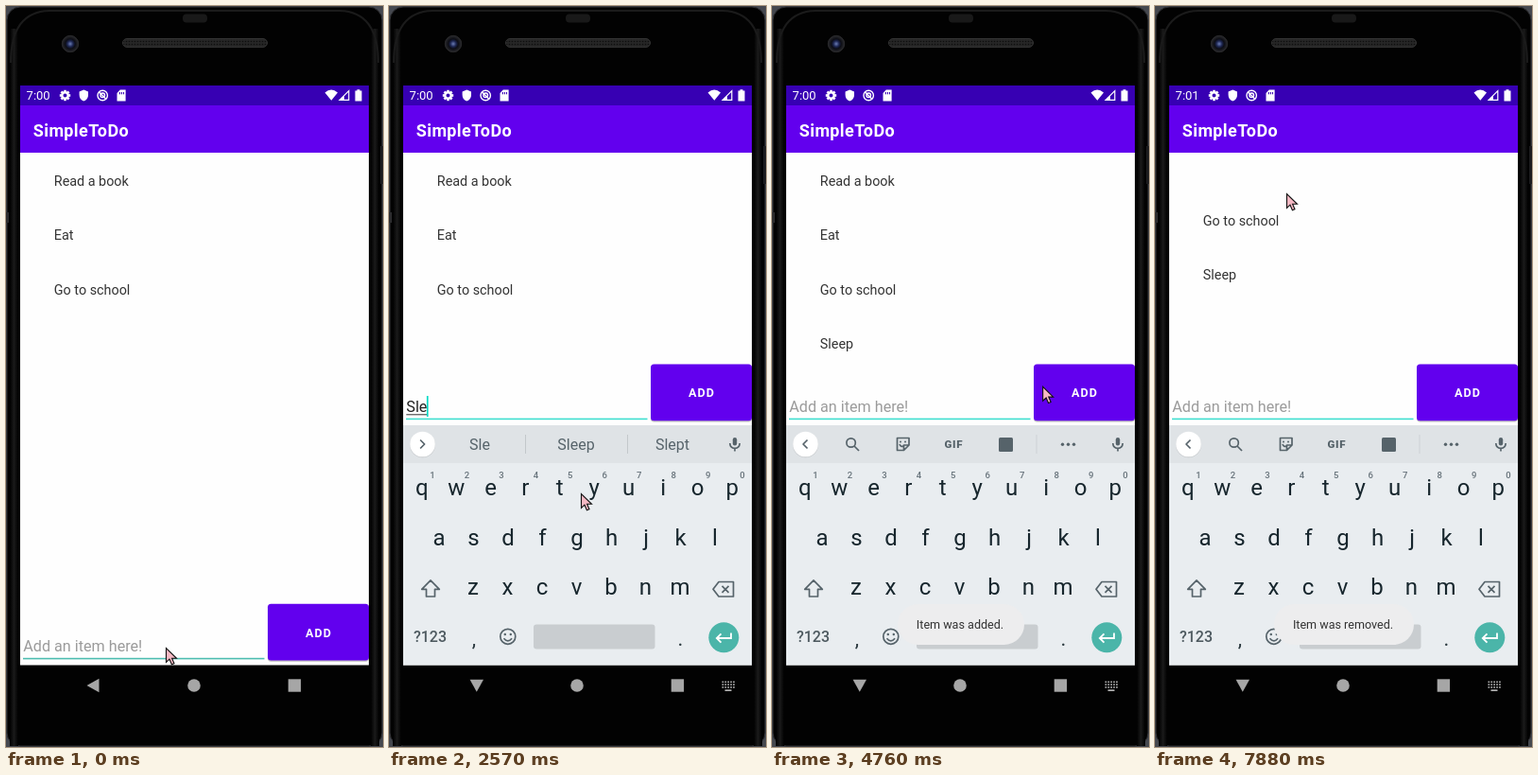
These frames come from a looping animation (399x783 px, 8000 ms). An HTML page:

```html
<!DOCTYPE html>
<html lang="en">
<head>
<meta charset="utf-8">
<title>To-do app</title>
<style>
html, body { margin: 0; width: 100%; height: 100%; overflow: hidden; background: #000; }
svg { display: block; width: 100vw; height: 100vh; font-family: Roboto, "Noto Sans", sans-serif; }
.mid { text-anchor: middle; }
.line { fill: none; stroke: #56636a; stroke-width: 1.7; stroke-linejoin: round; }
</style>
</head>
<body>
<svg id="stage" viewBox="0 0 399 783" preserveAspectRatio="none"></svg>
<script>
const LOOP = 8000;
const GREY = '#56636a', PURPLE = '#6200ee', TEAL = '#3fdfd0';
const FOCUS = 150, TYPE = 2160, KEY_GAP = 165, PRESS = 4110, ADDED = 4180, REMOVED = 7300;
const WORD = 'Sleep';
const ITEMS = ['Read a book', 'Eat', 'Go to school', WORD];
const stage = document.getElementById('stage');

const text = (x, y, size, fill, str, extra = '') =>
  `<text x="${x}" y="${y}" font-size="${size}" fill="${fill}" ${extra}>${str}</text>`;
const rect = (x, y, w, h, fill, extra = '') =>
  `<rect x="${x}" y="${y}" width="${w}" height="${h}" fill="${fill}" ${extra}/>`;
const path = (d, extra) => `<path d="${d}" ${extra}/>`;
const circle = (x, y, r, fill, extra = '') =>
  `<circle cx="${x}" cy="${y}" r="${r}" fill="${fill}" ${extra}/>`;
const repeat = (n, make) => Array.from({ length: n }, (_, i) => make(i)).join('');
const mid = 'class="mid"', line = 'class="line"';

function phone() {
  return `<defs>
    <linearGradient id="rim"><stop offset="0" stop-color="#000"/><stop offset=".5" stop-color="#1a1a1a"/><stop offset="1" stop-color="#000"/></linearGradient>
    <radialGradient id="lens"><stop offset="0" stop-color="#6a7cb5"/><stop offset=".35" stop-color="#1c2550"/><stop offset=".6" stop-color="#0c0d14"/><stop offset="1" stop-color="#2a2a2d"/></radialGradient>
    <pattern id="mesh" width="3" height="3" patternUnits="userSpaceOnUse"><rect width="3" height="3" fill="#262626"/><circle cx="1.5" cy="1.5" r=".8" fill="#0d0d0d"/></pattern>
    <clipPath id="btnClip"><rect x="277" y="378.5" width="107" height="60" rx="3.5"/></clipPath>
  </defs>` +
  rect(0, 0, 399, 783, '#45484f') +
  rect(1, 1, 397, 781, '#020202', 'rx="14" stroke="#303033"') +
  rect(4, 24, 9, 758, 'url(#rim)') + rect(386, 24, 9, 758, 'url(#rim)') +
  path('M5 60Q5 6 46 5H353Q394 6 394 60', 'fill="none" stroke="#1b1b1b" stroke-width="2"') +
  rect(0, 218, 3, 11, '#2c2c2e') + rect(396, 148, 3, 40, '#1c1c1e') +
  rect(187, 8.5, 26, 9, '#191919', 'rx="4"') +
  rect(123.5, 34.5, 153, 9, 'url(#mesh)', 'rx="4.5" stroke="#333"') +
  circle(68, 40, 8.7, 'url(#lens)', 'stroke="#29292b"');
}

function header() {
  const white = 'fill="#fff"', ring = 'stroke="#fff" stroke-width="1.4"';
  return rect(15, 84, 369, 21.5, '#3700b3') + rect(15, 105, 369, 50, PURPLE) +
    text(21.6, 99.4, 13, '#fff', '7:00', 'id="clock"') +
    repeat(8, i => rect(61.2, 88.8, 2.6, 3, '#fff', `transform="rotate(${i * 45} 62.5 94.5)"`)) +
    circle(62.5, 94.5, 3.2, 'none', 'stroke="#fff" stroke-width="2.4"') +
    path('M82.3 88.5L87 90.4V94Q87 98.6 82.3 100.5Q77.6 98.6 77.6 94V90.4Z', white) +
    circle(102.2, 94.5, 5.2, 'none', ring) + circle(102.2, 94.3, 2.3, 'none', ring) +
    path('M98.5 91L106 98.5', ring) +
    path('M120.8 88.6H126.6V100.4H117.5V92Z', white) +
    path('M120.5 91v2.3M122.5 91v2.3M124.5 91v2.3', 'stroke="#3700b3"') +
    path('M337.5 91.4Q344.3 85.8 351 91.4L344.3 99.8Z', white) +
    path('M362.8 89.6V99.3H353.1Z', 'fill="none" stroke="#fff" stroke-width="1.2"') +
    path('M358 94.5V99.3H353.1Z', white) +
    path('M371.5 88.3h3v1.3h2v10.8h-7V89.6h2Z', white) +
    text(28.8, 137.5, 18, '#fff', 'SimpleToDo', 'font-weight="600" letter-spacing=".38"');
}

const list = () => ITEMS.map((name, i) => text(50.8, 0, 14.37, '#333', name, `id="item${i}"`)).join('');

function inputRow() {
  return '<g id="row">' +
    text(18.3, 429.3, 16.16, '#9b9b9b', 'Add an item here!', 'id="hint"') +
    text(18.3, 429.3, 16.16, '#222', '', 'id="typed"') +
    rect(18.3, 431.3, 0, 1, '#333', 'id="mark"') +
    rect(18, 435.6, 255.5, 1.6, TEAL, 'id="rule"') +
    rect(18, 412, 1.7, 22, '#03dac5', 'id="caret"') +
    rect(277, 379.5, 107, 60, '#000', 'rx="3.5" opacity=".25"') +
    rect(277, 378.5, 107, 59.7, PURPLE, 'rx="3.5"') +
    `<g clip-path="url(#btnClip)">${circle(301, 395, 0, '#fff', 'id="ripple"')}</g>` +
    text(331, 413.4, 12.57, '#fff', 'ADD', `${mid} font-weight="600" letter-spacing="1.1"`) + '</g>';
}

function toolbar() {
  return '<g id="tools">' +
    circle(83.6, 461.5, 4.7, 'none', line) + path('M87 465L92 470', line) +
    path('M132.500 456.500H145V464L139.500 469.500H132.500ZM145 464H139.500V469.500M135 463Q136.500 466.500 139 465', line) +
    circle(136, 460.5, 1, GREY) + circle(141, 460.5, 1, GREY) +
    text(192.3, 467.4, 11.5, GREY, 'GIF', `${mid} font-weight="900" letter-spacing=".7"`) +
    rect(240, 456, 15, 15, GREY, 'rx="1.5"') + rect(279.5, 453, 1, 20, '#cdd2d5') +
    repeat(3, i => circle(307.5 + 6 * i, 463.3, 1.7, GREY)) + '</g><g id="sugs">' +
    repeat(3, i => text(96 + 102 * i, 469.3, 16, GREY, '', `${mid} id="sug${i}"`)) +
    repeat(2, i => rect(144 + 108 * i, 453, 1, 20, '#c3c8cb')) + '</g>';
}

function keyboard() {
  const keys = (row, x, y) => repeat(row.length, i => text(x + i * 36.5, y, 24, '#17262d', row[i], mid));
  return '<g id="kbd">' + rect(15, 443, 369, 253.5, '#e9edf0') + rect(15, 443, 369, 40, '#dfe3e6') +
    circle(35.5, 463.8, 13.5, '#000', 'opacity=".1"') + circle(35.5, 463, 13.3, '#fff') +
    path('M37.5 458.5L33 463L37.5 467.5', `${line} id="chev"`) + toolbar() +
    rect(363.8, 456, 4.4, 8.5, GREY, 'rx="2.2"') +
    path('M360.8 462Q361 467.3 366 467.3Q371 467.3 371.2 462M366 467.3V470.5', line) +
    keys('qwertyuiop', 34.7, 517) + keys('asdfghjkl', 53, 569.7) + keys('zxcvbnm', 89, 622.4) +
    repeat(10, i => text(46 + i * 36.45, 499.4, 9.5, '#66727a', (i + 1) % 10, `${mid} font-weight="500"`)) +
    path('M44 606.8L53.3 616.3H48.5V624H39.5V616.3H34.7Z', line) +
    path('M349 608.5H364.5V624H349L343 616.2ZM352.5 612.8L359.5 619.8M359.5 612.8L352.5 619.8', line) +
    text(43.5, 672.4, 16, '#4d595f', '?123', `${mid} font-weight="500"`) +
    text(90, 675.5, 22, '#2c3a40', ',', mid) + text(308.5, 675.5, 22, '#2c3a40', '.', mid) +
    circle(125.8, 666.3, 8, 'none', line) +
    repeat(2, i => circle(122.8 + 6 * i, 664, 1.2, GREY)) +
    path('M121.5 668.3Q125.8 673.5 130.1 668.3', line) +
    rect(153, 653.5, 128.5, 26, '#c9cdd0', 'rx="3"') +
    circle(354.3, 667.3, 16, '#4bb5a9') +
    path('M362 662.5V668H347M351.5 663.3L346.8 668L351.5 672.7', 'fill="none" stroke="#fff" stroke-width="1.8"') +
    '</g>';
}

function navBar() {
  const dots = repeat(15, i => rect(352.5 + i % 5 * 2.9, 713.5 + Math.floor(i / 5) * 2.8, 1.7, 1.6, '#b0b0b0'));
  return path('M85.5 718L98.5 710.8V725.2Z', 'id="back" fill="#a6a6a6"') +
    circle(199, 718, 6.8, '#a6a6a6') + rect(298.7, 711.3, 13.4, 13.4, '#a6a6a6') +
    `<g id="ime">${dots}${rect(355.5, 722.3, 7, 1.7, '#b0b0b0')}</g>`;
}

stage.innerHTML = phone() + rect(15, 84, 369, 612.5, '#fefefe') + header() +
  list() + inputRow() + keyboard() + navBar() +
  `<g id="toast">${rect(0, 632, 0, 43, '#ededee', 'id="pill" rx="21.5"')}${text(199, 658, 12.57, '#333', '', `${mid} id="note"`)}</g>` +
  `<g id="ptr">${path('M.5 .5V15.5L4 12.2L6.4 17.8L9 16.7L6.600 11.3H11.5Z', 'fill="#f6b9c4" stroke="#111" stroke-width="1.1"')}</g>`;

const el = {};
stage.querySelectorAll('[id]').forEach(n => el[n.id] = n);
const set = (id, name, value) => el[id].setAttribute(name, value);
const show = (id, on) => set(id, 'visibility', on ? 'visible' : 'hidden');
const say = (id, str) => { if (el[id].textContent !== str) el[id].textContent = str; };

// 0 before a, 1 after b, linear between
const ramp = (t, a, b) => Math.min(1, Math.max(0, (t - a) / (b - a)));

// time, x, y
const route = [[520, 169, 678], [790, 167, 607], [1180, 203, 515], [3300, 203, 515], [3580, 243, 448],
  [3830, 301, 393], [4680, 301, 393], [5040, 235, 432], [5600, 192, 404], [5800, 192, 404], [6400, 308, 800]];

function movePointer(t) {
  let [, x, y] = route[0];
  for (let i = 1; i < route.length; i++) {
    const [t0, x0, y0] = route[i - 1], [t1, x1, y1] = route[i];
    const p = ramp(t, t0, t1);
    x += (x1 - x0) * p;
    y += (y1 - y0) * p;
  }
  if (t >= REMOVED) [x, y] = [139, 198];
  set('ptr', 'transform', `translate(${x} ${y})`);
}

function slideKeyboard(t) {
  const left = (1 - ramp(t, FOCUS, 640)) ** 3;
  set('kbd', 'transform', `translate(0 ${54 * left})`);
  set('kbd', 'opacity', 1 - left);
  set('ime', 'opacity', 1 - left);
  set('back', 'transform', `rotate(${90 * (left - 1)} 92.5 717.7)`);
  set('row', 'transform', `translate(0 ${t < FOCUS + 50 ? 253.2 : 0})`);
  set('rule', 'fill', t < FOCUS ? '#4dbcb0' : TEAL);
}

function typeWord(t) {
  const count = t < TYPE || t >= ADDED ? 0 : Math.min(WORD.length, 1 + Math.floor((t - TYPE) / KEY_GAP));
  const word = WORD.slice(0, count);
  const guesses = count < WORD.length ? [word, WORD, 'Slept'] : [WORD, WORD + 'ing', WORD + 'y'];
  say('typed', word);
  const width = count ? el.typed.getComputedTextLength() : 0;
  set('mark', 'width', width);
  show('hint', !count);
  show('tools', !count);
  show('sugs', count);
  guesses.forEach((g, i) => say('sug' + i, g));
  set('chev', 'transform', count ? 'rotate(180 35.3 463)' : '');

  // the caret restarts its blink at every edit
  const edit = t >= ADDED ? ADDED : count ? TYPE + (count - 1) * KEY_GAP : FOCUS;
  show('caret', t >= edit && Math.floor((t - edit) / 500) % 2 === 0);
  set('caret', 'x', count ? 17.8 + width : 18);
}

function updateList(t) {
  const alpha = [1 - ramp(t, 7650, 7850), 1 - ramp(t, 7130, REMOVED), 1, ramp(t, ADDED, 4450)];
  const up = ramp(t, REMOVED, 7460) + ramp(t, 7820, 8050);
  alpha.forEach((a, i) => {
    set('item' + i, 'opacity', a);
    set('item' + i, 'y', 189.8 + 57.45 * (i > 1 ? i - up : i));
  });
  set('ripple', 'r', 110 * ramp(t, PRESS - 80, 4350));
  set('ripple', 'opacity', .22 * (1 - ramp(t, 4350, 4620)));
}

function updateToast(t) {
  const late = t >= REMOVED;
  const width = late ? 148 : 134;
  const start = late ? REMOVED : ADDED;
  const end = late ? LOOP : 6200;
  set('toast', 'opacity', ramp(t, start, start + 500) * (late ? 1 : 1 - ramp(t, end, end + 300)));
  say('note', late ? 'Item was removed.' : 'Item was added.');
  set('pill', 'x', 200 - width / 2);
  set('pill', 'width', width);
  say('clock', t < 7200 ? '7:00' : '7:01');
}

const start = performance.now();
function tick() {
  const t = (performance.now() - start) % LOOP;
  [movePointer, slideKeyboard, typeWord, updateList, updateToast].forEach(step => step(t));
  requestAnimationFrame(tick);
}
tick();
</script>
</body>
</html>
```
